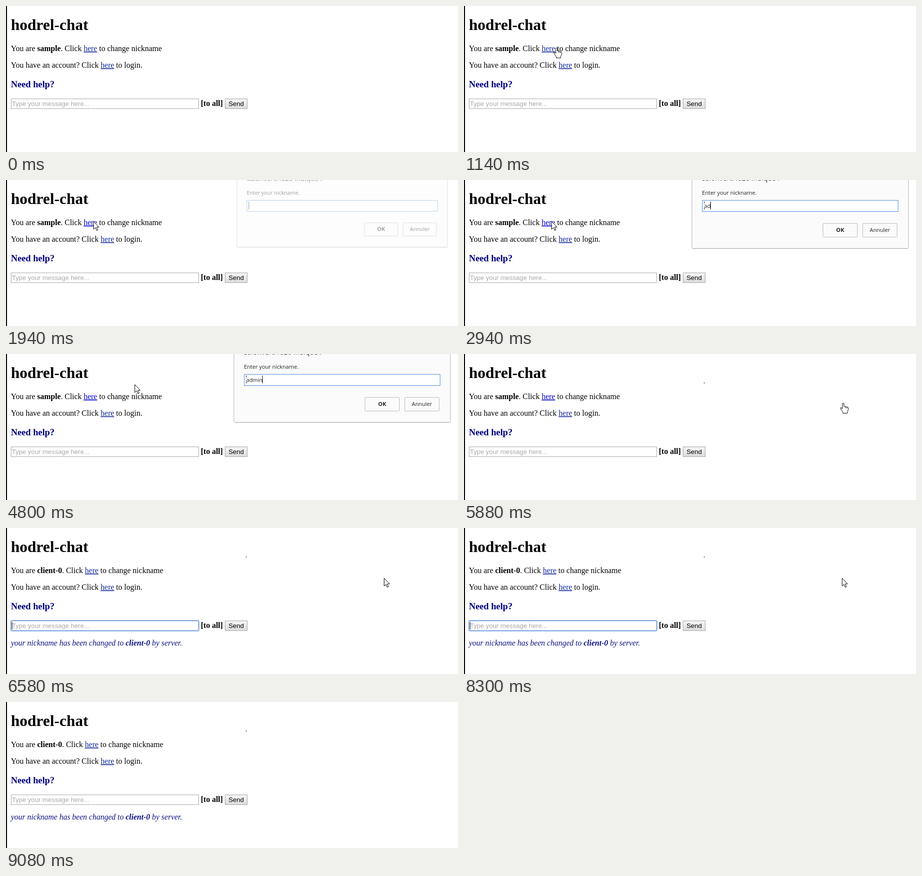
Write an HTML page that moves like this. It is 921x298 px and loops after 9160 ms.

```html
<!DOCTYPE html>
<html lang="en">
<head>
<meta charset="utf-8">
<title>Chat nickname demo</title>
<style>
  html, body { margin: 0; width: 100%; height: 100%; overflow: hidden; background: #fff; }
  svg { display: block; width: 921px; height: 298px; }
  text { white-space: pre; }
  .page { font: 16px "Liberation Serif", serif; }
  .control { font: 13.333px "Liberation Sans", sans-serif; }
  .dialog { font: 11.2px "Open Sans", sans-serif; fill: #222; }
  .bold { font-weight: bold; }
  .link { text-decoration: underline 1px; fill: #14289c; }
  .middle { text-anchor: middle; }
  .button { fill: url(#face); stroke: #a6a6a6; }
</style>
</head>
<body>
<svg viewBox="0 0 921 298">
  <defs>
    <linearGradient id="face" x2="0" y2="1">
      <stop stop-color="#f6f6f6"/><stop offset="1" stop-color="#dcdcdc"/>
    </linearGradient>
  </defs>
  <rect width="2" height="298"/>

  <g class="page">
    <text x="10" y="49" font-size="32" class="bold">hodrel-chat</text>
    <text x="10" y="92">You are <tspan class="bold" id="nickname">sample</tspan>. Click <tspan class="link" id="nickLink">here</tspan> to change nickname</text>
    <text x="10" y="126">You have an account? Click <tspan class="link">here</tspan> to login.</text>
    <text x="10" y="166" font-size="18.72" class="bold" fill="#000080">Need help?</text>
    <text x="397" y="204" class="bold">[to all]</text>
    <text x="10" y="240" font-style="italic" fill="#0c1080" id="notice">your nickname has been changed to <tspan class="bold">client-0</tspan> by server.</text>
  </g>

  <g class="control">
    <rect x="10.5" y="189.5" width="382" height="20" fill="#fff" stroke="#a9a9a9"/>
    <text x="12" y="204" fill="#a9a9a9">Type your message here...</text>
    <g id="focus" fill="none">
      <rect x="9.5" y="188.5" width="384" height="22" rx="2" stroke="#9dbdec"/>
      <rect x="10.5" y="189.5" width="382" height="20" rx="1" stroke="#5587d2"/>
      <rect x="12" y="192" width="1" height="15" fill="#000"/>
    </g>
    <rect class="button" x="446.5" y="189.5" width="45" height="20"/>
    <text class="middle" x="469" y="204">Send</text>
  </g>

  <rect id="speck" x="489" y="58" width="1" height="2"/>

  <g class="dialog" id="dialog">
    <rect x="465" y="-10" width="441" height="151" rx="3" fill="#000" opacity=".13"/>
    <rect x="464.5" y="-10" width="441" height="149.5" rx="2" fill="#fbfbfb" stroke="#b5b5b5"/>
    <text x="485" y="1" font-size="14.1">salonvert:4020 indique :</text>
    <text x="485" y="30">Enter your nickname.</text>
    <rect x="485.5" y="41.5" width="399" height="23" fill="#fff" stroke="#4d90e0"/>
    <path id="oldCaret" d="M489.5 44V60" stroke="#000" stroke-dasharray="3 2 1 7"/>
    <text x="489.5" y="57" id="typed"></text>
    <rect id="caret" y="44" width="1" height="16" fill="#000"/>
    <g fill="#fbfbfb" stroke="#b9b9b9">
      <rect x="731.5" y="88.5" width="70" height="28" rx="1"/>
      <rect x="812.5" y="88.5" width="70" height="28" rx="1"/>
    </g>
    <text class="middle bold" x="766.5" y="106">OK</text>
    <text class="middle" x="847.5" y="106">Annuler</text>
  </g>

  <path id="cursor" fill="#fff" stroke="#000" stroke-linejoin="round"/>
</svg>
<script>
const LOOP = 9160;
const $ = id => document.getElementById(id);
const show = (id, visible) => { $(id).style.display = visible ? "" : "none"; };

const SHAPES = {
  arrow: "M0 0V16L3.7 12.6L6.3 18.5L8.7 17.5L6.2 11.6H11Z",
  hand: "M-1.5 12V1.5Q0-.5 1.5 1.5V7.5Q3 5.5 4.5 8Q6.5 6.5 7.5 9Q10 8 10.5 10.5V14" +
        "Q10 17 8.5 18V21.5H-.5V19Q-3 16-5.5 11.5Q-5.5 9-3.5 10.5L-1.5 12M4.5 8V11M7.5 9V11.5",
  none: ""
};

// Each stroke walks its points in a number of equal hops, then rests.
const STROKES = [
  { from: 0, shape: "none", points: [[0, 0]] },
  { from: 150, to: 990, hops: 11, shape: "arrow", points: [[757, 272], [520, 205], [300, 128], [195, 78]] },
  { from: 1070, to: 1380, hops: 4, shape: "hand", points: [[189, 84], [186, 84], [179, 84]] },
  { from: 1540, shape: "arrow", points: [[178, 84]] },
  { from: 4800, to: 4970, hops: 2, shape: "arrow", points: [[262, 62], [484, 39]] },
  { from: 5120, to: 5500, hops: 5, shape: "arrow",
    points: [[580, 65], [700, 105], [800, 142], [868, 125], [810, 100], [774, 86]] },
  { from: 5650, shape: "arrow", points: [[770, 100]] },
  { from: 5880, shape: "hand", points: [[772, 99]] },
  { from: 5960, shape: "arrow", points: [[770, 102]] },
  { from: 8300, to: 8690, hops: 5, shape: "arrow", points: [[770, 102], [825, 185], [886, 284]] },
  { from: 8760, shape: "none", points: [[0, 0]] }
];

const KEY_TIMES = [2720, 2940, 3170, 3560, 3810];

function along(points, u) {
  const place = u * (points.length - 1);
  const i = Math.floor(place);
  const a = points[i], b = points[i + 1] || a;
  return a.map((v, axis) => Math.round(v + (b[axis] - v) * (place - i)));
}

function drawCursor(t) {
  const { from, to = from + 1, hops = 1, shape, points } = STROKES.findLast(s => t >= s.from);
  const hop = Math.min(hops, Math.floor((t - from) / (to - from) * hops + 0.1));
  const [x, y] = along(points, hop / hops);
  $("cursor").setAttribute("d", SHAPES[shape]);
  $("cursor").setAttribute("transform", `translate(${x + 0.5} ${y + 0.5})`);
}

function drawDialog(t) {
  show("dialog", t >= 1940 && t < 5880);
  const [scale, opacity] = t < 2020 ? [0.973, 0.42] : t < 2100 ? [0.992, 0.8]
    : t < 5800 ? [1, 1] : [0.98, 0.5];
  $("dialog").setAttribute("transform", `translate(685 45) scale(${scale}) translate(-685 -45)`);
  $("dialog").setAttribute("opacity", opacity);

  const count = KEY_TIMES.filter(time => t >= time).length;
  $("typed").textContent = "admin".slice(0, count);
  const width = count ? $("typed").getComputedTextLength() : 0;
  $("caret").setAttribute("x", Math.round(489 + width));
  show("oldCaret", count > 0);
}

function draw(now) {
  const t = now % LOOP;
  const renamed = t >= 5960;
  $("nickname").textContent = renamed ? "client-0" : "sample";
  $("nickLink").style.fill = t >= 1540 && !renamed ? "#0000cc" : "";
  show("notice", renamed);
  show("focus", t >= 6040 && t < 9080);
  show("speck", t >= 5880);
  drawDialog(t);
  drawCursor(t);
  requestAnimationFrame(draw);
}
draw(performance.now());
</script>
</body>
</html>
```
